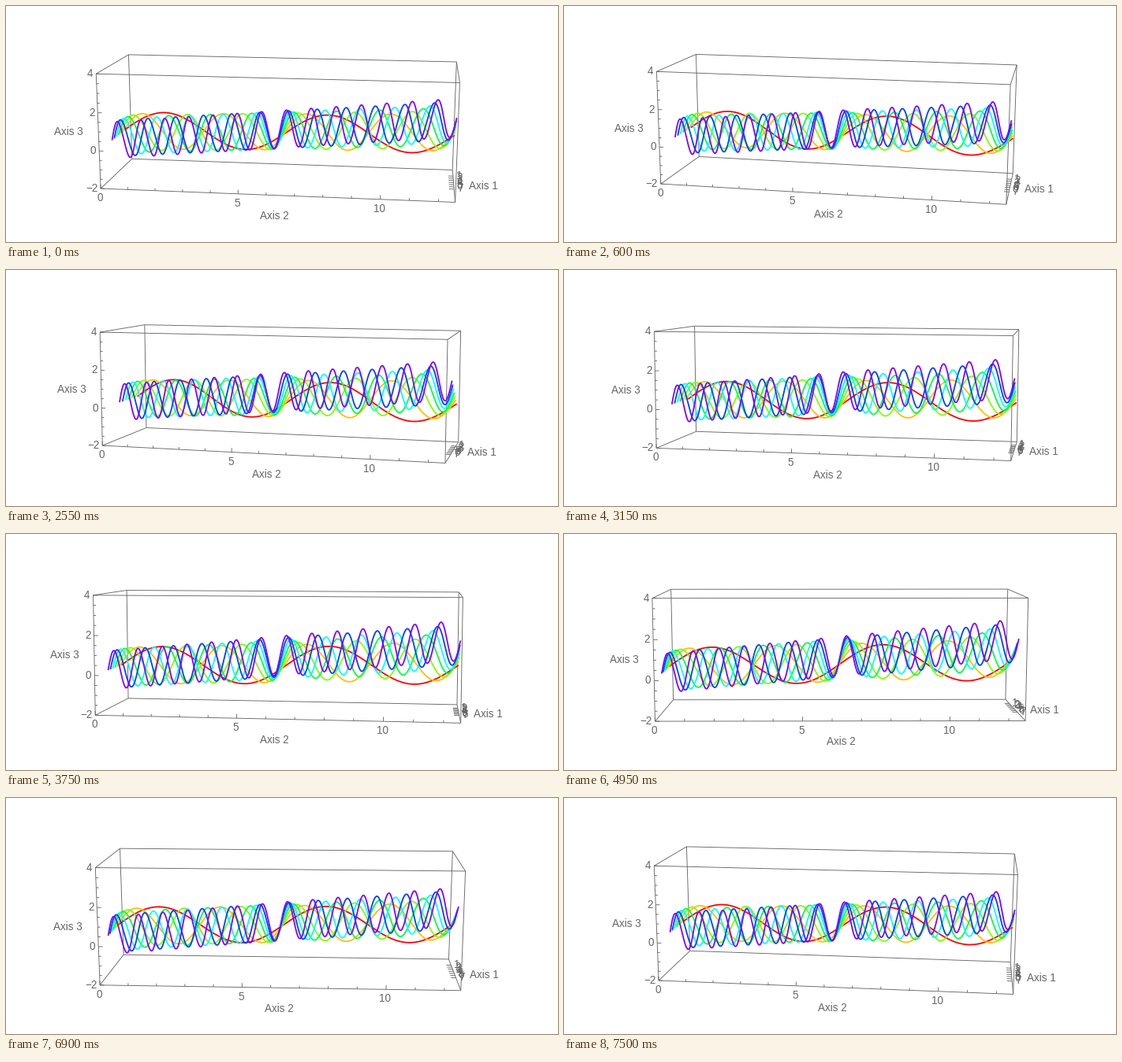
Write a matplotlib script that moves like this. It is 700x300 px and loops after 7.65 s.

```python
import colorsys
import itertools

import numpy as np
import matplotlib.pyplot as plt
from matplotlib.animation import FuncAnimation
from matplotlib.collections import LineCollection

W, H, DPI = 700, 300, 100
STEPS = 50
FOCAL = 1353.5
GRAY = "0.4"
PX = 72 / DPI

# Data ranges of the three axes and the box proportions (1 : 3 : 1)
LOW = np.array([-2, 0, -2])
HIGH = np.array([4 * np.pi, 4 * np.pi, 4])
SIZE = np.array([1 / 3, 1, 1 / 3])

plt.rcParams["font.family"] = "Liberation Sans"
fig = plt.figure(figsize=(W / DPI, H / DPI), dpi=DPI, facecolor="white")
ax = fig.add_axes([0, 0, 1, 1])
ax.set_xlim(0, W)
ax.set_ylim(H, 0)
ax.axis("off")


def to_box(points):
    return ((np.asarray(points, float) - LOW) / (HIGH - LOW) - 0.5) * SIZE


def camera(frame):
    """Eye position, circling slowly in front of the box."""
    t = 2 * np.pi * frame / STEPS
    return np.array([3, 0.4 + 0.5 * np.sin(t), 0.5 + 0.2 * np.cos(t)])


def project(points, eye):
    """Perspective view of box points, looking at the box centre."""
    dist = np.linalg.norm(eye)
    ahead = eye / dist
    right = np.array([-eye[1], eye[0], 0]) / np.hypot(eye[0], eye[1])
    up = np.cross(ahead, right)
    scale = FOCAL / (dist - points @ ahead)
    return np.stack([W / 2 + points @ right * scale,
                     H / 2 - points @ up * scale], axis=-1)


def box_edges():
    corners = np.array(list(itertools.product((0, 1), repeat=3)))
    pairs = [(a, b) for a, b in itertools.combinations(corners, 2)
             if np.abs(a - b).sum() == 1]
    return (np.array(pairs) - 0.5) * SIZE


def tick(point, axis, length):
    start = to_box(point)
    end = start.copy()
    end[axis] += length
    return start, end


segments = list(box_edges())
labels = []  # (artist, anchor in the box, pixel offset)


def add_label(text, point, dx, dy, ha="center", size=13.5):
    artist = ax.text(0, 0, text, color=GRAY, fontsize=size * PX,
                     ha=ha, va="center", zorder=4)
    labels.append((artist, to_box(point), np.array([dx, dy])))


XMAX, YMAX, ZMIN = HIGH[0], HIGH[1], LOW[2]

for n in range(1, 8):
    segments.append(tick((n, YMAX, ZMIN), 1, -0.014))
    add_label(str(n), (n, YMAX, ZMIN), 7.5, -0.5)

for y in range(13):
    major = y % 5 == 0
    segments.append(tick((XMAX, y, ZMIN), 2, 0.012 if major else 0.007))
    if major:
        add_label(str(y), (XMAX, y, ZMIN), -1, 12)

for z in np.arange(-2, 4.1, 0.5):
    major = z % 2 == 0
    segments.append(tick((XMAX, 0, z), 1, 0.012 if major else 0.007))
    if major:
        add_label(f"{z:.0f}".replace("-", "\u2212"), (XMAX, 0, z), -4, 0, "right")

middle = (LOW + HIGH) / 2
add_label("Axis 1", (middle[0], YMAX, ZMIN), 37.5, 1)
add_label("Axis 2", (XMAX, middle[1], ZMIN), 0.5, 26.5)
add_label("Axis 3", (XMAX, 0, middle[2]), -37.5, 0)

segments = np.array(segments)
frame_lines = LineCollection([], colors=GRAY, linewidths=0.9 * PX, zorder=1)
ax.add_collection(frame_lines)

y = np.linspace(0, 4 * np.pi, 700)
curves = []
for k in range(1, 8):
    color = colorsys.hsv_to_rgb((k - 1) / 8, 1, 1)
    line, = ax.plot([], [], color=color, lw=1.8 * PX, zorder=2 + k / 10,
                    solid_capstyle="butt")
    wave = np.sin(k * y) + k * y / 50
    curves.append((line, to_box(np.column_stack([np.full_like(y, k), y, wave]))))


def update(frame):
    eye = camera(frame)
    frame_lines.set_segments(project(segments, eye))
    for line, points in curves:
        line.set_data(*project(points, eye).T)
    for artist, anchor, offset in labels:
        artist.set_position(project(anchor, eye) + offset)
    return [frame_lines] + [c[0] for c in curves] + [l[0] for l in labels]


anim = FuncAnimation(fig, update, frames=STEPS + 1, interval=150,
                     repeat=True, repeat_delay=0)
plt.show()
```
